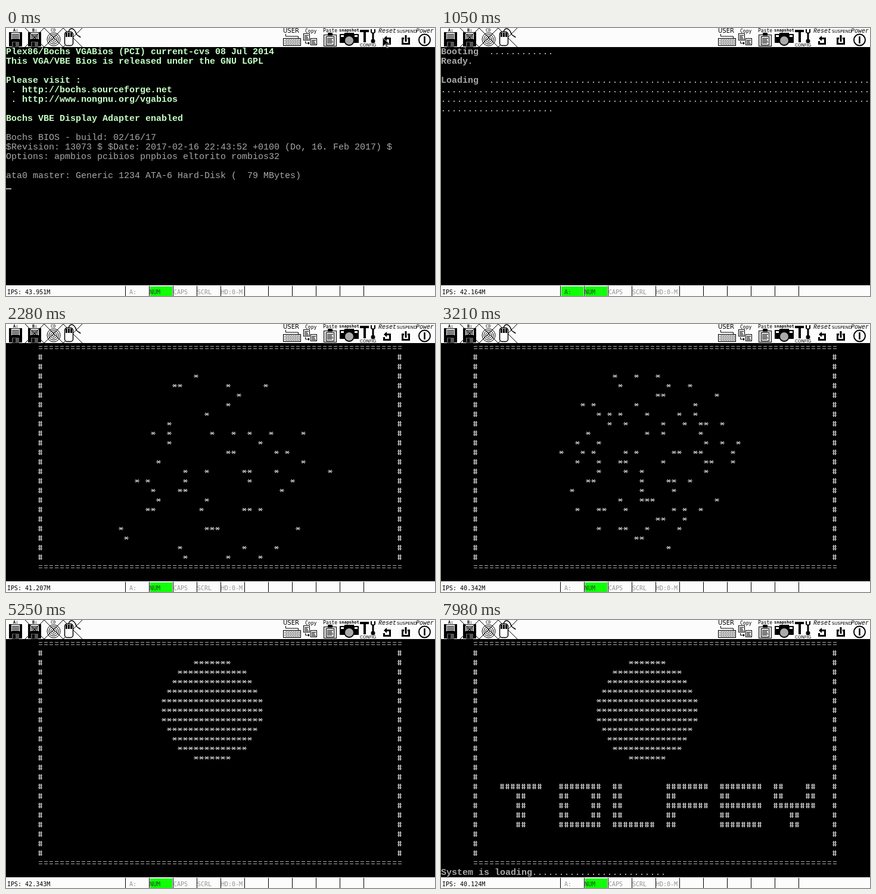
An HTML page with a canvas for the animation above (8000 ms loop, 720x450 px).

```html
<!DOCTYPE html>
<html lang="en">
<head>
<meta charset="utf-8">
<title>Emulator boot screen</title>
<style>
html, body { margin: 0; width: 100%; height: 100%; overflow: hidden; background: #000; }
canvas { display: block; }
</style>
</head>
<body>
<canvas id="stage" width="720" height="450"></canvas>
<script>
const g = document.getElementById('stage').getContext('2d');
const LOOP = 8000, TOP = 32, CELL_W = 9, CELL_H = 16;
const PAPER = '#fcfcfc', INK = '#000', GRAY = '#a8a8a8', PALE = '#c4ffc4', GREEN = '#10ff08';
const MONO = '"Liberation Mono", monospace';
const SMALL = '"DejaVu Sans Mono", monospace';

const BIOS = [
  'Plex86/Bochs VGABios (PCI) current-cvs 08 Jul 2014',
  'This VGA/VBE Bios is released under the GNU LGPL',
  '',
  'Please visit :',
  ' . http://bochs.sourceforge.net',
  ' . http://www.nongnu.org/vgabios',
  '',
  'Bochs VBE Display Adapter enabled',
  '',
  'Bochs BIOS - build: 02/16/17',
  '$Revision: 13073 $ $Date: 2017-02-16 22:43:52 +0100 (Do, 16. Feb 2017) $',
  'Options: apmbios pcibios pnpbios eltorito rombios32',
  '',
  'ata0 master: Generic 1234 ATA-6 Hard-Disk (  79 MBytes)'
];
const WORD = [
  '########   ######## ##        ######## ######## ##    ##',
  '   ##      ##    ## ##        ##       ##       ##    ##',
  '   ##      ##    ## ##        ######## ######## ########',
  '   ##      ##    ## ##        ##       ##          ##',
  '   ##      ######## ########  ##       ########    ##'
];
const LETTER_COLS = [[0, 11], [11, 22], [20, 32], [30, 42], [39, 52], [48, 62]];
const SPEEDS = [43.951, 42.164, 41.207, 40.342, 41.118, 42.343, 42.871, 43.408, 40.124];

const clamp = (v, lo, hi) => Math.max(lo, Math.min(hi, v));
const hash = n => { const v = Math.sin(n * 127.1 + 3.7) * 43758.5; return v - Math.floor(v); };

function box(x, y, w, h, color = INK) {
  g.fillStyle = color;
  g.fillRect(x, y, w, h);
}
function text(s, x, y, font, color = INK) {
  g.font = font;
  g.fillStyle = color;
  g.fillText(s, x, y);
}
function line(points, width = 1, color = INK) {
  g.beginPath();
  for (let i = 0; i < points.length; i += 2) g.lineTo(points[i], points[i + 1]);
  g.lineWidth = width;
  g.strokeStyle = color;
  g.stroke();
}
function circle(x, y, r, width = 1) {
  g.beginPath();
  g.arc(x, y, r, 0, Math.PI * 2);
  g.lineWidth = width;
  g.strokeStyle = INK;
  g.stroke();
}
function shape(points, color = INK) {
  g.beginPath();
  for (let i = 0; i < points.length; i += 2) g.lineTo(points[i], points[i + 1]);
  g.fillStyle = color;
  g.fill();
}

// Text screen of 80 by 25 cells; the symbols are built from bars on the cell grid
const SYMBOLS = {
  '.': [[3, 10, 2, 2]],
  '=': [[1, 5, 6, 1], [1, 9, 6, 1]],
  '#': [[1, 3, 2, 9], [4, 3, 2, 9], [0, 5, 7, 1], [0, 9, 7, 1]],
  '*': [[0, 7, 8, 1], [2, 6, 4, 3], [1, 5, 2, 1], [5, 5, 2, 1], [1, 9, 2, 1], [5, 9, 2, 1]]
};
function print(s, col, row, color = GRAY, weight = 'normal') {
  const y = TOP + row * CELL_H;
  text(s.replace(/[.=#*]/g, ' '), col * CELL_W, y + 12, `${weight} 15px ${MONO}`, color);
  [...s].forEach((ch, i) => {
    for (const [dx, dy, w, h] of SYMBOLS[ch] || []) box((col + i) * CELL_W + dx, y + dy, w, h, color);
  });
}

const disc = [];
for (let row = 2; row <= 12; row++)
  for (let col = 26; col <= 50; col++)
    if (Math.hypot((col - 38) * CELL_W, (row - 7) * CELL_H) < 85) disc.push([col, row]);

function drawStars(t) {
  const progress = clamp(Math.floor((t - 1740) / 60) * 60 / 3180, 0, 1);
  const spread = 1.3 * (1 - progress);
  disc.forEach(([c, r], i) => {
    if (hash(i + 0.5) >= 0.25 + 0.75 * progress) return;
    const col = Math.round(37 + (c - 37) * (1 + spread) + (hash(i) - 0.5) * 6 * spread);
    const row = Math.round(2 + (r - 2) * (1 + spread) + hash(i + 0.25) * 3 * spread);
    if (col > 6 && col < 73 && row < 23) print('*', col, row);
  });
}

function drawBios() {
  BIOS.forEach((s, row) => print(s, 0, row, row < 8 ? PALE : GRAY, row < 8 ? 'bold' : 'normal'));
  box(0, TOP + 14 * CELL_H + 13, 9, 2, GRAY);
}
function drawLoader(t) {
  if (t < 420) return;
  print('Booting  ' + '.'.repeat(clamp((t - 420) / 12, 0, 12)), 0, 0, GRAY, 'bold');
  if (t >= 570) print('Ready.', 0, 1, GRAY, 'bold');
  if (t < 600) return;
  const s = 'Loading  ' + '.'.repeat((t - 600) * 0.56);
  for (let i = 0; i < s.length; i += 80) print(s.slice(i, i + 80), 0, 3 + i / 80, GRAY, 'bold');
}
function drawSplash(t) {
  const rows = Math.min(24, (t - 1440) / 5);
  for (let row = 0; row < rows; row++)
    print(row % 23 ? '#'.padEnd(67) + '#' : '='.repeat(68), 6, row);
  if (t >= 1740) drawStars(t);
  WORD.forEach((s, i) => {
    if (t < 5265 + i * 30) return;
    LETTER_COLS.forEach(([from, col]) => print(s.slice(from, from + 8), col, 15 + i));
  });
  if (t >= 5400)
    print('System is loading' + '.'.repeat((t - 5295) / 107), 0, 24, GRAY, 'bold');
}

function floppy(x, label) {
  text(label, x + 7, 6, `bold 7px ${SMALL}`);
  box(x, 7, 22, 24);
  box(x + 4, 8, 14, 11, PAPER);
  for (let y = 10; y < 19; y += 2) box(x + 5, y, 12, 1);
  box(x + 5, 23, 12, 9, '#555');
  box(x + 7, 24, 4, 7, INK);
}
function cross(x) {
  line([x, 0, x + 32, 32]);
  line([x, 32, x + 32, 0]);
}
function page(x, y, w, h) {
  box(x, y, w, h);
  box(x + 1, y + 1, w - 2, h - 2, PAPER);
  for (let i = 3; i < h - 2; i += 2) box(x + 2, y + i, w - 4 - i % 3, 1);
}

function drawToolbar(t) {
  box(0, 0, 720, 32, PAPER);
  floppy(5, 'A:');
  floppy(37, 'B:');
  cross(32);

  text('CD', 75, 6, `7px ${SMALL}`);
  for (const r of [2, 5, 8, 11]) circle(80, 19, r);
  cross(64);

  cross(96);
  g.beginPath();
  g.roundRect(98.5, 6.5, 14, 23, 4);
  g.fillStyle = PAPER;
  g.fill();
  g.lineWidth = 1.5;
  g.stroke();
  for (const x of [100, 104, 108]) box(x, 8, 3, 7);
  g.beginPath();
  g.moveTo(105, 6);
  g.bezierCurveTo(109, -4, 116, 3, 118, 10);
  g.bezierCurveTo(120, 14, 124, 13, 125, 16);
  g.stroke();

  text('USER', 465, 8, '10px "DejaVu Sans", sans-serif');
  line([469.5, 10, 469.5, 14, 490.5, 14, 490.5, 17]);
  box(465, 17, 30, 13);
  box(466, 18, 28, 11, '#ddd');
  for (let y = 19; y < 28; y += 2)
    for (let x = 467 + y % 4; x < 493; x += 3) box(x, y, 1, 1);

  text('Copy', 502, 8, `8px ${SMALL}`);
  page(499, 9, 11, 12);
  page(511, 17, 11, 12);
  line([502.5, 22, 502.5, 25.5, 509, 25.5]);
  shape([507, 23, 510, 25.5, 507, 28]);

  text('Paste', 532, 7, `8px ${SMALL}`);
  box(533, 11, 22, 20);
  box(534, 12, 20, 18, '#ddd');
  box(540, 8, 8, 5);
  page(537, 14, 14, 15);

  text('snapshot', 559, 6, `bold 7px ${SMALL}`);
  box(560, 10, 32, 15);
  box(568, 8, 16, 4);
  box(562, 12, 5, 3, PAPER);
  box(585, 12, 5, 3, PAPER);
  g.beginPath();
  g.arc(576, 21, 8, 0, 7);
  g.fillStyle = '#aaa';
  g.fill();
  circle(576, 21, 8, 2);

  box(594, 3, 15, 4);
  box(600, 3, 4, 21);
  line([616, 8, 616, 24], 3);
  line([613, 2, 613, 7, 616, 9, 619, 7, 619, 2], 2);
  circle(616, 22, 2.5, 2);
  text('CONFIG', 594, 31, '7px "DejaVu Sans", sans-serif');

  text('Reset', 625, 8, `italic 10px ${MONO}`);
  line([638, 17.5, 644.5, 17.5, 644.5, 26.5, 634.5, 26.5, 634.5, 22], 3);
  shape([634, 17.5, 639, 13, 639, 22]);

  text('SUSPEND', 656, 8, '7px "DejaVu Sans", sans-serif');
  line([668, 17.5, 665.5, 17.5, 665.5, 26.5, 676.5, 26.5, 676.5, 17.5, 674, 17.5], 3);
  line([671, 12, 671, 23], 3);

  text('Power', 688, 8, `italic 10px ${MONO}`);
  circle(702.5, 20, 9.5, 2);
  line([702.5, 14, 702.5, 26], 2.5);

  if (t < 390) {
    shape([632, 16, 632, 32, 636, 28, 639, 34, 642, 33, 639, 27, 645, 27], '#888');
    shape([633, 18, 633, 30, 637, 26, 640, 32, 638, 26, 642, 26]);
  }
}

function drawStatus(t) {
  const font = `10px ${SMALL}`, dim = '#949494', lit = '#174f17';
  const reading = t >= 420 && t < 1440;
  box(0, 432, 720, 18, PAPER);
  text(`IPS: ${SPEEDS[Math.floor(t / 900)].toFixed(3)}M`, 2, 447, font);
  if (reading) box(202, 434, 37, 16, GREEN);
  box(242, 434, 37, 16, GREEN);
  text('A:', 207, 447, font, reading ? lit : dim);
  text('NUM', 241, 447, font, lit);
  ['CAPS', 'SCRL', 'HD:0-M'].forEach((s, i) => text(s, 281 + i * 40, 447, font, dim));
  for (let x = 200; x <= 600; x += 40) box(x, 433, 1, 17);
}

function draw(now) {
  const t = now % LOOP;
  box(0, 0, 720, 450);
  if (t < 390) drawBios();
  else if (t < 1440) drawLoader(t);
  else drawSplash(t);
  drawToolbar(t);
  drawStatus(t);
}

let start;
function tick(now) {
  start ??= now;
  draw(now - start);
  requestAnimationFrame(tick);
}
requestAnimationFrame(tick);
</script>
</body>
</html>
```
